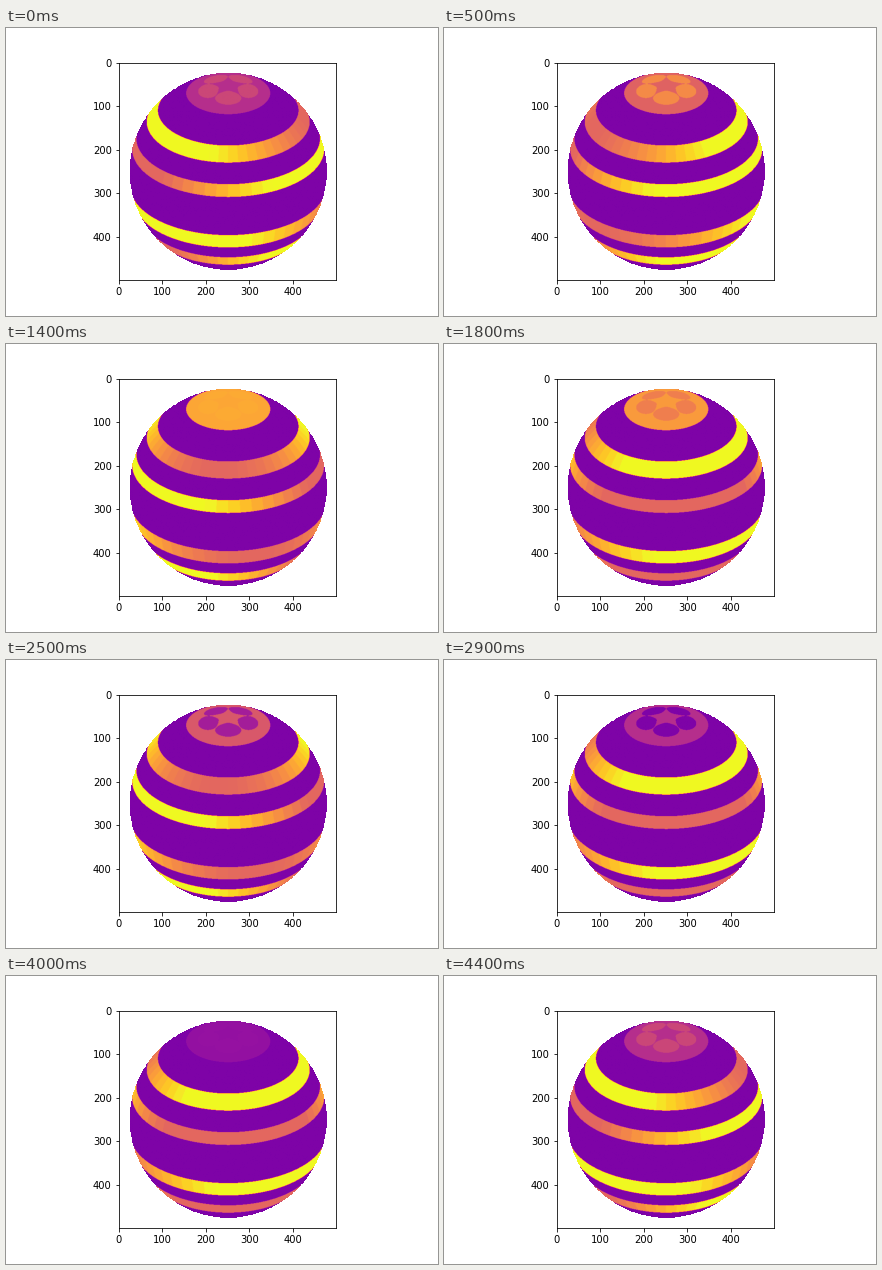
Recreate the animation shown at these times as a matplotlib script. Size 432 by 288 pixels, loop 4500 ms.

```python
import numpy as np
import matplotlib.pyplot as plt
from matplotlib.animation import FuncAnimation

FRAMES, STEP_MS = 45, 100
SIZE, RADIUS = 500, 228
TILT = np.radians(30)
SEGMENT = 7.2
BALL = 0.25

# polar range, turns per 11 steps, dip azimuth at step 0, mean, depth
BANDS = [
    (45, 55, -1, 92, 0.92, 0.31),
    (67.5, 75, 2, -92, 0.84, 0.34),
    (100, 110, -1, 116, 0.92, 0.31),
    (120, 130, 2, -90, 0.84, 0.34),
]

plt.rcParams.update({"font.family": "DejaVu Sans", "font.size": 10})


def sphere_angles():
    """Polar angle and azimuth (0 = front, + = right) of each pixel, in degrees."""
    rows, cols = np.mgrid[:SIZE, :SIZE]
    u = (cols - SIZE / 2) / RADIUS
    v = (SIZE / 2 - rows) / RADIUS
    outside = u**2 + v**2 > 1
    w = np.sqrt(np.clip(1 - u**2 - v**2, 0, 1))
    up = v * np.cos(TILT) + w * np.sin(TILT)
    front = w * np.cos(TILT) - v * np.sin(TILT)
    polar = np.degrees(np.arccos(np.clip(up, -1, 1)))
    return polar, np.degrees(np.arctan2(u, front)), outside


polar, azimuth, outside = sphere_angles()
segment = (np.floor(azimuth / SEGMENT) + 0.5) * SEGMENT

cap = polar < 25
wedge = (azimuth + 36) % 72 - 36
spots = ((polar - 12) / 6) ** 2 + (wedge / 35) ** 2 < 1
rings = [(polar >= a) & (polar < b) for a, b, *_ in BANDS]


def surface(i):
    values = np.full((SIZE, SIZE), BALL)
    turn = 2 * np.pi * i / (FRAMES - 1)
    values[cap] = 0.54 + 0.26 * np.sin(turn - 0.5)
    values[spots] = max(BALL, 0.5 + 0.34 * np.sin(turn))
    for ring, (_, _, turns, start, mean, depth) in zip(rings, BANDS):
        dip = start + turns * 360 * i / 11
        wave = mean - depth * np.cos(np.radians(segment[ring] - dip))
        values[ring] = np.clip(wave, 0.61, 1)
    return np.ma.masked_array(values, outside)


fig, ax = plt.subplots(figsize=(6, 4), dpi=72)
fig.subplots_adjust(left=0.125, right=0.9, bottom=0.125, top=0.88)
image = ax.imshow(surface(0), cmap="plasma", vmin=0, vmax=1)


def update(i):
    image.set_data(surface(i))
    return (image,)


anim = FuncAnimation(fig, update, frames=FRAMES, interval=STEP_MS,
                     repeat=True, repeat_delay=0, blit=False)
plt.show()
```
